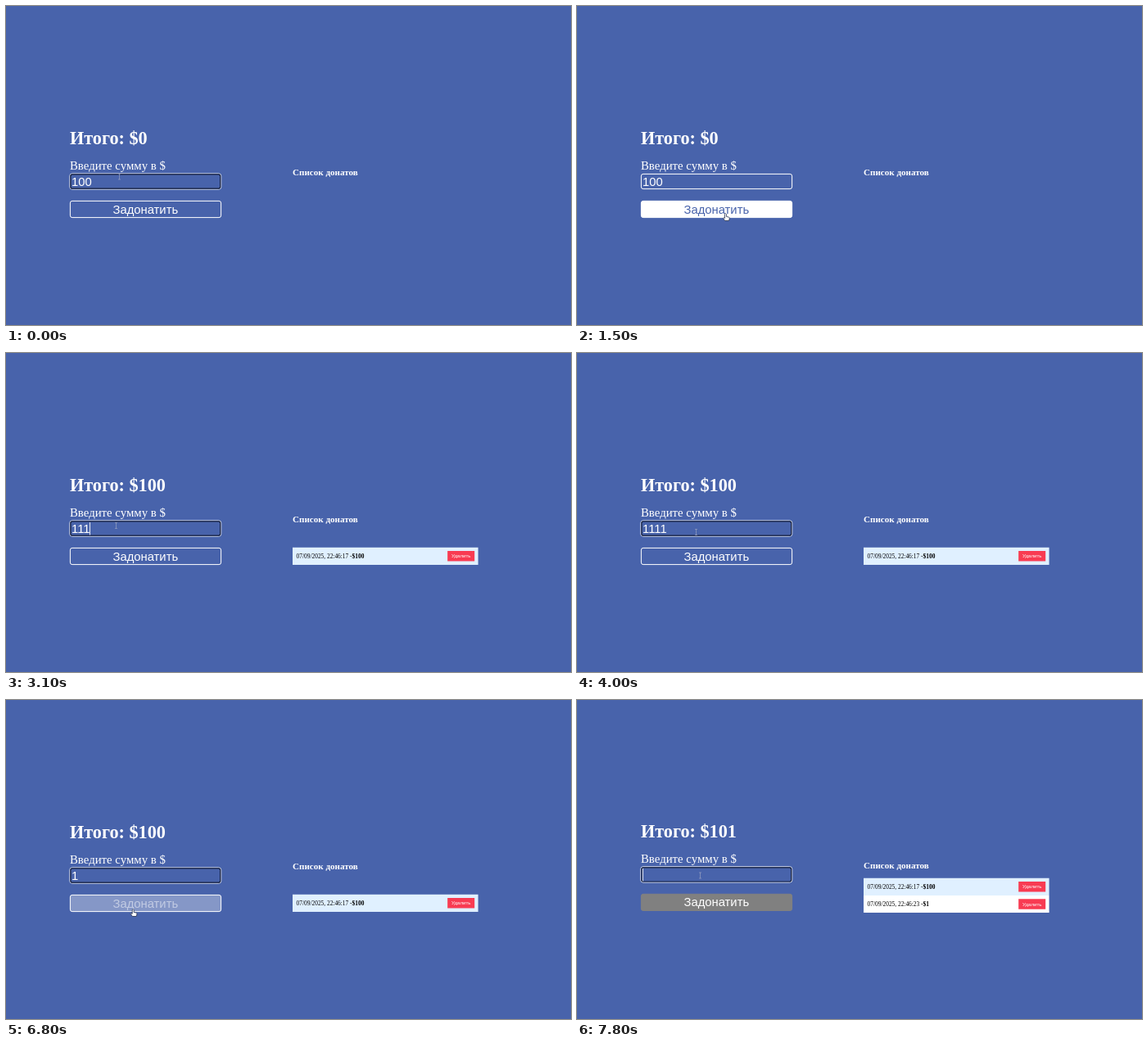
Recreate the animation shown at these times as an HTML page with a canvas. Size 690 by 390 pixels, loop 8000 ms.

```html
<!DOCTYPE html>
<html lang="ru">
<head>
<meta charset="utf-8">
<title>Донаты</title>
<style>
  html, body { margin: 0; width: 100%; height: 100%; overflow: hidden; background: #4863ab; }
  canvas { display: block; width: 690px; height: 390px; }
</style>
</head>
<body>
<canvas width="690" height="390"></canvas>
<script>
const ctx = document.querySelector('canvas').getContext('2d');
const LOOP = 8000, STEP = 100, EM = 7.4;
const SERIF = '"Liberation Serif", "Times New Roman", serif';
const SANS = '"Liberation Sans", Arial, sans-serif';
const BLUE = [72, 99, 171], WHITE = [255, 255, 255], GREY = [128, 128, 128];
const FIRST_DONATION = 1600, SECOND_DONATION = 7000;

// Each track is a list of [time, value...].
const typed = [[0, '100'], [FIRST_DONATION, ''], [2700, '1'], [2800, '11'], [2900, '111'],
  [3600, '1111'], [4500, '111'], [4800, '11'], [5400, ''], [5500, '1'], [SECOND_DONATION, '']];
const focus = [[0, true], [1400, false], [2200, true], [6900, false], [7600, true]];
const caret = [[0, false], [700, true], [1400, false], [2300, true], [4000, false],
  [4600, true], [5300, false], [5500, true], [6300, false], [7600, true]];
const pointer = [[0, 'beam'], [1000, 'arrow'], [1100, 'hand'], [1800, 'arrow'], [2000, 'beam'],
  [6600, 'arrow'], [6700, 'hand'], [7300, 'arrow'], [7600, 'beam']];
const pointerPath = [[0, 138.5, 208.5], [900, 138.5, 208.5], [1200, 176, 260], [1500, 181.5, 253.5],
  [1700, 177, 249], [1900, 128.7, 204.3], [2200, 134.5, 211], [3600, 134.5, 211], [4000, 145.5, 219],
  [6400, 145.5, 219], [6800, 155.2, 255.5], [7200, 155, 248], [7600, 150.5, 214.5]];
const hover = [[0, 0], [1000, 0], [1300, 1], [1900, 1], [1901, 0], [6700, 0], [7000, 1]];
const disabled = [[0, 0], [FIRST_DONATION, 0], [1900, 1], [2700, 1], [3000, 0],
  [5200, 0], [5300, .6], [5400, .8], [5600, 0], [SECOND_DONATION, 0], [7300, 1]];

const at = (track, t) => track.filter(key => key[0] <= t).pop()[1];

function tween(track, t) {
  const next = track.findIndex(key => key[0] > t);
  if (next < 0) return track[track.length - 1].slice(1);
  const a = track[next - 1], b = track[next], k = (t - a[0]) / (b[0] - a[0]);
  return a.slice(1).map((v, i) => v + (b[i + 1] - v) * k);
}

const mix = (a, b, k) => a.map((v, i) => v + (b[i] - v) * k);
const rgb = color => `rgb(${color.map(Math.round)})`;

function text(str, x, y, font, color = '#fff', align = 'left') {
  ctx.font = font;
  ctx.fillStyle = color;
  ctx.textAlign = align;
  ctx.fillText(str, x, y);
  return ctx.measureText(str).width;
}

function box(x, y, w, h, r, fill, stroke, width = 1) {
  ctx.beginPath();
  ctx.roundRect(x, y, w, h, r);
  if (fill) { ctx.fillStyle = fill; ctx.fill(); }
  if (stroke) { ctx.strokeStyle = stroke; ctx.lineWidth = width; ctx.stroke(); }
}

function drawInput(t, y) {
  if (at(focus, t)) {
    box(77.8, y - .2, 185, 19.4, 3, null, '#d5dbea');
    box(78.9, y + .9, 182.8, 17.2, 2.2, null, '#17203c', 1.2);
  } else {
    box(78.4, y + .4, 184.2, 18.2, 2.5, null, '#fff');
  }
  const width = text(at(typed, t), 80, y + 14.5, `${2 * EM}px ${SANS}`);
  if (at(caret, t)) {
    ctx.fillStyle = '#dfe4f2';
    ctx.fillRect(Math.floor(80 + width), y + 2, 1, 15.5);
  }
}

function drawButton(t, y) {
  const [h] = tween(hover, t), [d] = tween(disabled, t);
  const shade = (normal, over, off) => rgb(mix(mix(normal, over, h), off, d));
  box(78.4, y + .4, 184.2, 20.2, 2.5, shade(BLUE, WHITE, GREY), shade(WHITE, WHITE, GREY));
  text('Задонатить', 170.3, y + 15.5, `${2 * EM}px ${SANS}`, shade(WHITE, BLUE, WHITE), 'center');
}

function drawRow(y, time, sum, fill) {
  box(350, y, 226.6, 21.2, 0, fill);
  const stamp = `07/09/2025, ${time} -`;
  const width = text(stamp, 354.6, y + 12.8, `${EM}px ${SERIF}`, '#000');
  text(sum, 354.6 + width, y + 12.8, `bold ${EM}px ${SERIF}`, '#000');
  box(539.2, y + 4.4, 33, 12.4, 0, '#f83b52');
  text('Удалить', 555.7, y + 12.7, `${EM / 1.2}px ${SANS}`, '#fff', 'center');
}

const shapes = {
  arrow: new Path2D('M0 0V7L1.6 5.6L2.6 8L3.7 7.5L2.7 5.2H4.8Z'),
  hand: new Path2D('M-1 1Q0-.6 1 1V4L4 4.6Q5 5 4.7 6.5L4 9H-.8L-3 6Q-3 4.7-1 5.8Z'),
  beam: new Path2D('M-1.5-3.5H1.5M0-3.5V3.5M-1.5 3.5H1.5')
};

function drawPointer(t) {
  const kind = at(pointer, t), [x, y] = tween(pointerPath, t);
  ctx.save();
  ctx.translate(x, y);
  ctx.lineWidth = .8;
  if (kind === 'beam') {
    ctx.strokeStyle = '#8d98bd';
  } else {
    ctx.fillStyle = '#fff';
    ctx.fill(shapes[kind]);
    ctx.strokeStyle = '#26304f';
  }
  ctx.stroke(shapes[kind]);
  ctx.restore();
}

function draw(t) {
  const count = (t >= FIRST_DONATION) + (t >= SECOND_DONATION);
  const lift = count === 2 ? 1.1 : 0;
  ctx.fillStyle = rgb(BLUE);
  ctx.fillRect(0, 0, 690, 390);

  text('Итого: $' + [0, 100, 101][count], 78, 169 - lift, `bold ${3 * EM}px ${SERIF}`);
  text('Введите сумму в $', 78, 200 - lift, `${2 * EM}px ${SERIF}`);
  drawInput(t, 205 - lift);
  drawButton(t, 238 - lift);

  text('Список донатов', 350, 206.8 - lift, `bold ${1.5 * EM}px ${SERIF}`);
  if (count) drawRow(count === 2 ? 217.7 : 237.7, '22:46:17', '$100', '#e0f0ff');
  if (count === 2) drawRow(238.9, '22:46:23', '$1', '#fff');
  drawPointer(t);
}

function tick(now) {
  draw(Math.floor(now % LOOP / STEP) * STEP);
  requestAnimationFrame(tick);
}
requestAnimationFrame(tick);
</script>
</body>
</html>
```
